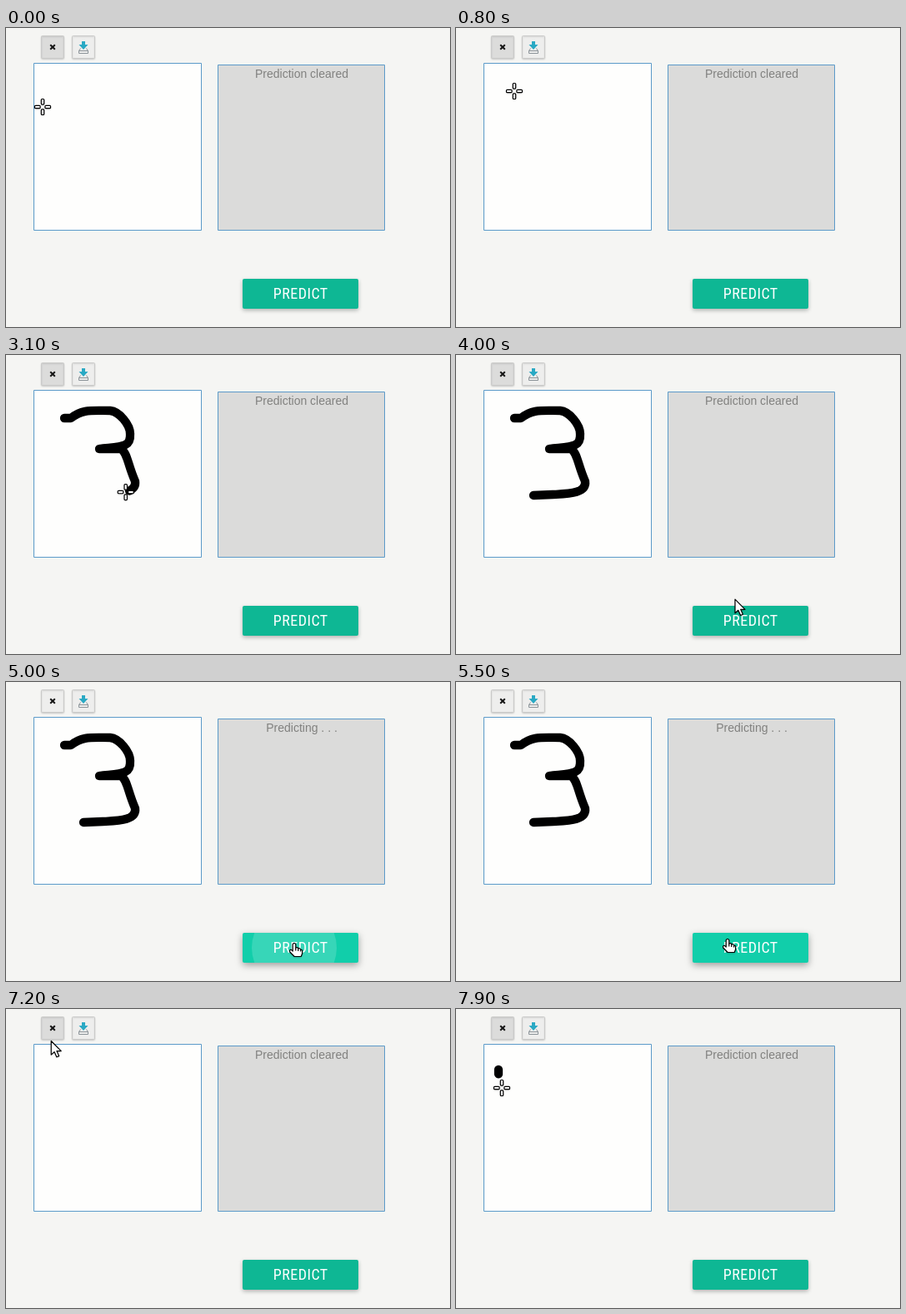
Animation, 533 px wide and 360 px high, one loop 8000 ms. Source, as an HTML page with a canvas:

```html
<!DOCTYPE html>
<html lang="en">
<head>
<meta charset="utf-8">
<title>Digit prediction</title>
<style>
html, body { margin: 0; width: 100%; height: 100%; overflow: hidden; background: #f5f5f3; }
canvas { display: block; width: 533px; height: 360px; }
svg { position: absolute; width: 0; height: 0; }
</style>
</head>
<body>
<canvas id="stage" width="533" height="360"></canvas>
<svg id="routes"></svg>
<script>
const ctx = document.getElementById('stage').getContext('2d');
const routes = document.getElementById('routes');
const LOOP = 8000, STEP = 100;
const CLICK = 4900, RESULT = 5800, CLEAR = 6900;
const PAD = { x: 33, y: 42, w: 202, h: 202 };
const OUT = { x: 254, y: 44, w: 201, h: 200 };
const BTN = { x: 284, y: 302, w: 139, h: 36 };
const NORMAL = [14, 183, 148], HOVER = [17, 206, 170], FOCUS = [11, 138, 112];

const linear = u => u;
const smooth = u => u * u * (3 - 2 * u);
const easeOut = u => 1 - (1 - u) ** 2;
const clamp = v => Math.max(0, Math.min(1, v));
const ramp = (t, from, length) => clamp((t - from) / length);
const mix = (a, b, k) => a + (b - a) * k;
const blend = (a, b, k) => a.map((v, i) => mix(v, b[i], k));
const inside = (r, x, y) => x > r.x && x < r.x + r.w && y >= r.y && y < r.y + r.h;

// A pointer trip along a path; trips with a lag leave ink behind the pointer.
function trip(from, to, d, ease, lag) {
  routes.innerHTML += `<path d="${d}"/>`;
  return { from, to, d, ease, lag };
}

const trips = [
  trip(0, 800, 'M44 95C22 80 34 15 50 18S62 60 70 76', linear),
  trip(1600, 3500, 'M70 76H78C92 65 102 67 125 67C136 68 149 84 149 95' +
    'C150 112 138 110 112 113H138C146 118 146 132 155 152C157 167 134 167 116 168L93 169',
    u => 1 - (1 - u) ** 1.1, 35),
  trip(3500, 4000, 'M93 169C130 185 290 250 335 295', smooth),
  trip(4000, 4600, 'M335 295L346 314', easeOut),
  trip(5000, 5500, 'M346 314L326 309', smooth),
  trip(5500, 6600, 'M326 309C280 290 120 60 69 16', smooth),
  trip(6600, 6900, 'M69 16L56 21', easeOut),
  trip(7000, 7500, 'M56 21L51 73', smooth),
  trip(7500, 7900, 'M51 73V78L55 95', u => u ** 5, 100)
];
trips.forEach((p, i) => {
  p.line = routes.children[i];
  p.size = p.line.getTotalLength();
  p.shape = new Path2D(p.d);
});
const [digit, second] = trips.filter(p => p.lag);

const reach = (p, t) => p.size * p.ease(ramp(t, p.from, p.to - p.from));

function ink(p, t) {
  if (t <= p.from) return;
  ctx.save();
  ctx.lineWidth = 10.3;
  ctx.lineCap = ctx.lineJoin = 'round';
  ctx.setLineDash([reach(p, t - p.lag), p.size * 2]);
  ctx.stroke(p.shape);
  ctx.restore();
}

function box(r, fill, line, radius = 0) {
  ctx.beginPath();
  ctx.roundRect(r.x + 0.5, r.y + 0.5, r.w - 1, r.h - 1, radius);
  ctx.fillStyle = fill;
  ctx.fill();
  ctx.lineWidth = 1;
  ctx.strokeStyle = line;
  ctx.stroke();
}

function label(str, x, y, size = 14) {
  ctx.font = `${size}px "Liberation Sans", Arial, sans-serif`;
  ctx.textAlign = 'center';
  ctx.fillStyle = '#81817f';
  ctx.fillText(str, x, y);
}

function shadow(color, blur, dy) {
  ctx.shadowColor = color;
  ctx.shadowBlur = blur;
  ctx.shadowOffsetY = dy;
}

const CLOSE = new Path2D('M53.2 20.2L58.8 25.8M58.8 20.2L53.2 25.8');
const TRAY = new Path2D('M89.5 24.5L87.5 27.5V30.5H98.5V27.5L96.5 24.5M87.5 27.5H98.5');
const DOWN = new Path2D('M91 16H95V20H98.5L93 26L87.5 20H91Z');

function tools(t) {
  const active = t < CLICK || t >= CLEAR - STEP;
  ctx.save();
  shadow('rgba(0,0,0,.14)', 2, 1);
  box({ x: 42, y: 9, w: 28, h: 28 }, active ? '#dcdcdb' : '#eeeeed', '#cacac9', 1);
  box({ x: 79, y: 9, w: 28, h: 28 }, '#eeeeed', '#cacac9', 1);
  ctx.restore();
  ctx.strokeStyle = '#8b9398';
  ctx.stroke(TRAY);
  ctx.fillStyle = '#2aa9c4';
  ctx.fill(DOWN);
  ctx.strokeStyle = '#161616';
  ctx.lineWidth = 2;
  ctx.stroke(CLOSE);
}

function output(t) {
  box(OUT, '#dbdbda', '#5b9ac9');
  if (t < CLICK || t >= CLEAR) label('Prediction cleared', 355, 60);
  else if (t < RESULT) label('Predicting . . .', 355, 60);
  else {
    label('Prediction :', 353, 60);
    label('3', 355, 164, 91);
    label('Probability : 0.988', 355, 216);
  }
}

function ripple(age) {
  if (age < 0 || age >= 1) return;
  ctx.save();
  ctx.clip();
  ctx.beginPath();
  ctx.arc(346, 320, 30 + 105 * age, 0, 7);
  ctx.fillStyle = `rgba(255,255,255,${0.2 * (1 - age)})`;
  ctx.fill();
  ctx.restore();
}

function predictButton(t) {
  const left = ramp(t, RESULT - STEP, 300);
  const over = ramp(t, 4100, 300) * (1 - left);
  const rest = t < CLICK ? NORMAL : blend(FOCUS, NORMAL, ramp(t, CLEAR - STEP, 300));

  ctx.save();
  shadow(`rgba(0,0,0,${mix(0.28, 0.36, over)})`, mix(5, 8, over), mix(2, 3, over));
  ctx.beginPath();
  ctx.roundRect(BTN.x, BTN.y, BTN.w, BTN.h, 2);
  ctx.fillStyle = `rgb(${blend(rest, HOVER, over).map(Math.round)})`;
  ctx.fill();
  ctx.restore();
  ripple((t - CLICK) / 500);

  ctx.save();
  ctx.font = '18px "Roboto Condensed", Roboto, sans-serif';
  ctx.fontStretch = 'condensed';
  ctx.letterSpacing = '0.5px';
  ctx.textAlign = 'center';
  ctx.fillStyle = '#fff';
  ctx.fillText('PREDICT', 353.7, 326);
  ctx.restore();
}

const ARROW = new Path2D('M0-.8V15.8L3.8 12.3L6.6 18.5L9.4 17.3L6.7 11.3H12Z');
const HAND = new Path2D('M-1.8 1.8Q0-1.2 1.8 1.8V6Q4.4 4.8 4.8 7Q7.2 6 7.6 8.2Q9.6 8 9.6 10V13L8.2 16.5H.2L-5.2 11Q-6.2 8.2-3.6 8.4L-1.8 10Z');
const KNUCKLES = new Path2D('M1.8 6V9.5M4.8 7V10M7.6 8.2V10.5');
const BAR = new Path2D();
BAR.roundRect(-1.7, -9.5, 3.4, 6.6, 1);
const CROSS = new Path2D();
for (let a = 0; a < 360; a += 90) CROSS.addPath(BAR, new DOMMatrix().rotate(a));

function pointer(t) {
  const now = trips.filter(p => p.from <= t).pop();
  const { x, y } = now.line.getPointAtLength(reach(now, t));
  const hand = inside(BTN, x, y);
  const shape = inside(PAD, x, y) ? CROSS : hand ? HAND : ARROW;
  ctx.save();
  ctx.translate(x, y);
  ctx.lineJoin = 'round';
  ctx.lineWidth = 1.2;
  ctx.fillStyle = '#fff';
  ctx.strokeStyle = '#000';
  ctx.save();
  shadow('rgba(0,0,0,.3)', 2, 1);
  ctx.fill(shape);
  ctx.restore();
  ctx.stroke(shape);
  if (hand) ctx.stroke(KNUCKLES);
  ctx.restore();
}

function draw(t) {
  ctx.fillStyle = '#f5f5f3';
  ctx.fillRect(0, 0, 533, 360);
  tools(t);
  box(PAD, '#fefefd', '#5b9ac9');
  ctx.strokeStyle = '#000';
  if (t < CLEAR) ink(digit, t);
  ink(second, t);
  output(t);
  predictButton(t);
  pointer(t);
}

function tick() {
  const t = performance.now() % LOOP;
  draw(Math.floor(t / STEP) * STEP);
  requestAnimationFrame(tick);
}
tick();
</script>
</body>
</html>
```
